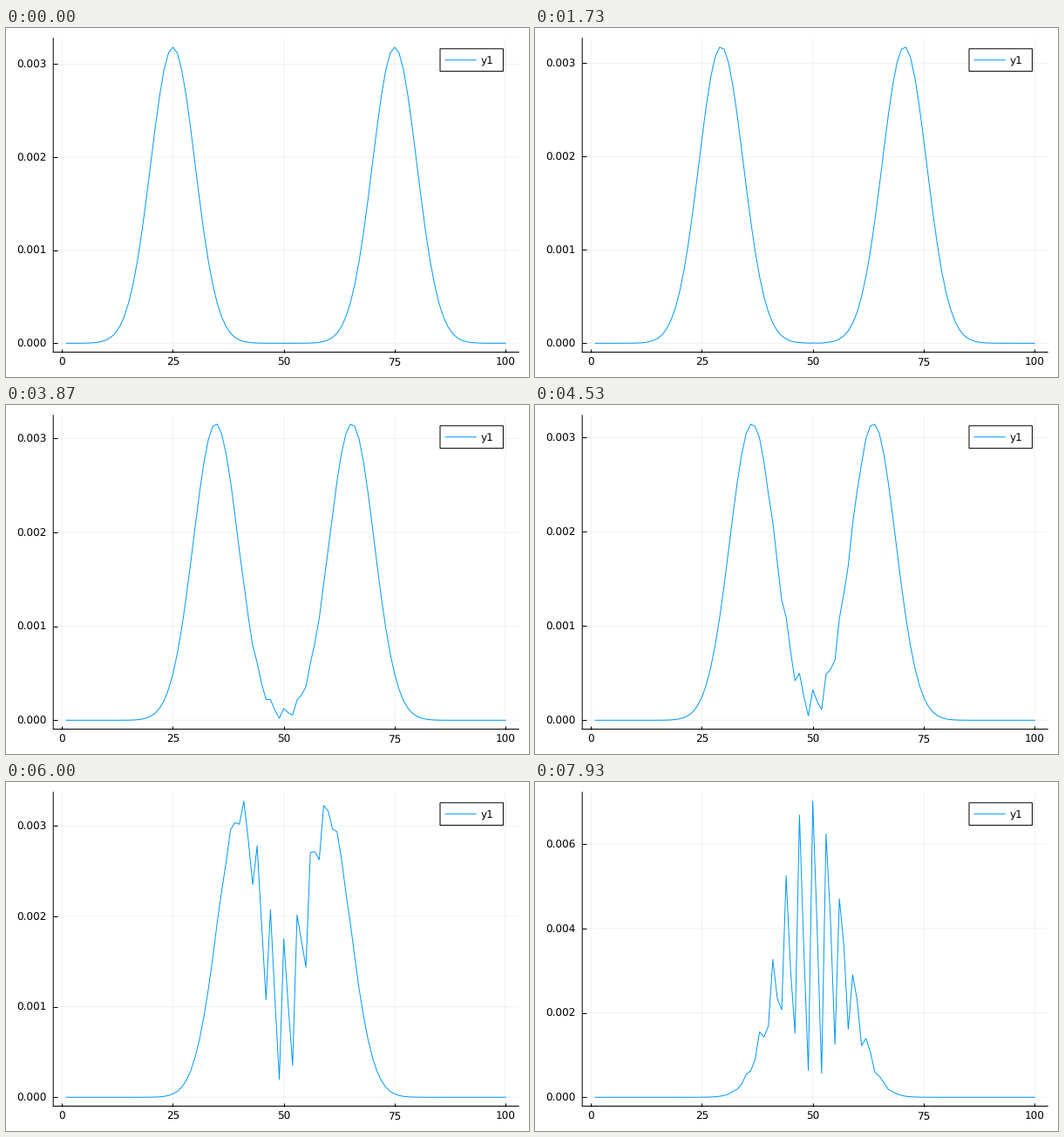
Recreate the animation shown at these times as a matplotlib script. Size 600 by 400 pixels, loop 8 s.

```python
import numpy as np
import matplotlib.pyplot as plt
from matplotlib.animation import FuncAnimation
from matplotlib.lines import Line2D
from matplotlib.patches import Rectangle

W, H, DPI = 600, 400, 100
PX = 72 / DPI                      # one pixel in points
LEFT, RIGHT, TOP, BOTTOM = 54.2, 588.2, 11.8, 371.5
STEPS, TICKS_PER_STEP, LOOP = 120, 3, 8000
FRAMES = STEPS * TICKS_PER_STEP
BLUE = "#009AFA"
N, DT, K, VAR = 100, 0.2, 1.0, 50.0

plt.rcParams.update({"font.family": "DejaVu Sans", "font.size": 12 * PX,
                     "text.hinting": "none", "path.snap": False})

# two wave packets running towards each other on a lattice
x = np.arange(1, N + 1)


def packet(center, k):
    bell = np.exp(-(x - center) ** 2 / (2 * VAR)) / np.sqrt(2 * np.pi * VAR)
    return bell * np.exp(1j * k * x)


hamiltonian = np.eye(N) - 0.5 * (np.eye(N, k=1) + np.eye(N, k=-1))
energy, modes = np.linalg.eigh(hamiltonian)
weights = modes.T @ (packet(25, K) + packet(75, -K))


def density(step):
    psi = modes @ (np.exp(-1j * energy * DT * step) * weights)
    return np.abs(psi) ** 2


fig = plt.figure(figsize=(W / DPI, H / DPI), dpi=DPI, facecolor="white")
ax = fig.add_axes([LEFT / W, 1 - BOTTOM / H,
                   (RIGHT - LEFT) / W, (BOTTOM - TOP) / H])
ax.spines[["top", "right"]].set_visible(False)
for side in ("left", "bottom"):
    ax.spines[side].set_linewidth(PX)
ax.set_axisbelow(True)
ax.grid(color="black", alpha=0.06, linewidth=PX)
ax.tick_params(direction="in", length=4.5 * PX, width=PX)
ax.tick_params(axis="x", pad=6.5 * PX)
ax.tick_params(axis="y", pad=8 * PX)
margin = 0.03 * (N - 1)
ax.set_xlim(1 - margin, N + margin)
ax.set_xticks(range(0, 101, 25))
curve, = ax.plot([], [], color=BLUE, linewidth=PX, solid_joinstyle="round")

# legend in pixel coordinates
fig.add_artist(Rectangle((498 / W, 1 - 49.6 / H), 72.4 / W, 25.8 / H,
                         facecolor="white", edgecolor="black",
                         linewidth=PX, zorder=5))
fig.add_artist(Line2D([504 / W, 539.3 / W], [1 - 36.7 / H] * 2,
                      color=BLUE, linewidth=PX, zorder=6))
fig.text(545 / W, 1 - 41.2 / H, "y1", va="baseline", zorder=6)


def draw(i):
    # the lead of one tick keeps each step change on time despite rounding
    step = min((i + 1) // TICKS_PER_STEP, STEPS - 1)
    y = density(step)
    low, high = y.min(), y.max()
    pad = 0.03 * (high - low)
    top = high + pad
    gap = 0.001 if top < 0.007 else 0.002
    ticks = np.arange(0, top, gap)
    ax.set_yticks(ticks, [f"{t:.3f}" for t in ticks])
    ax.set_ylim(low - pad, top)
    curve.set_data(x, y)
    return curve,


anim = FuncAnimation(fig, draw, frames=FRAMES, interval=LOOP / FRAMES,
                     init_func=lambda: draw(0), repeat=True, repeat_delay=0)
plt.show()
```
